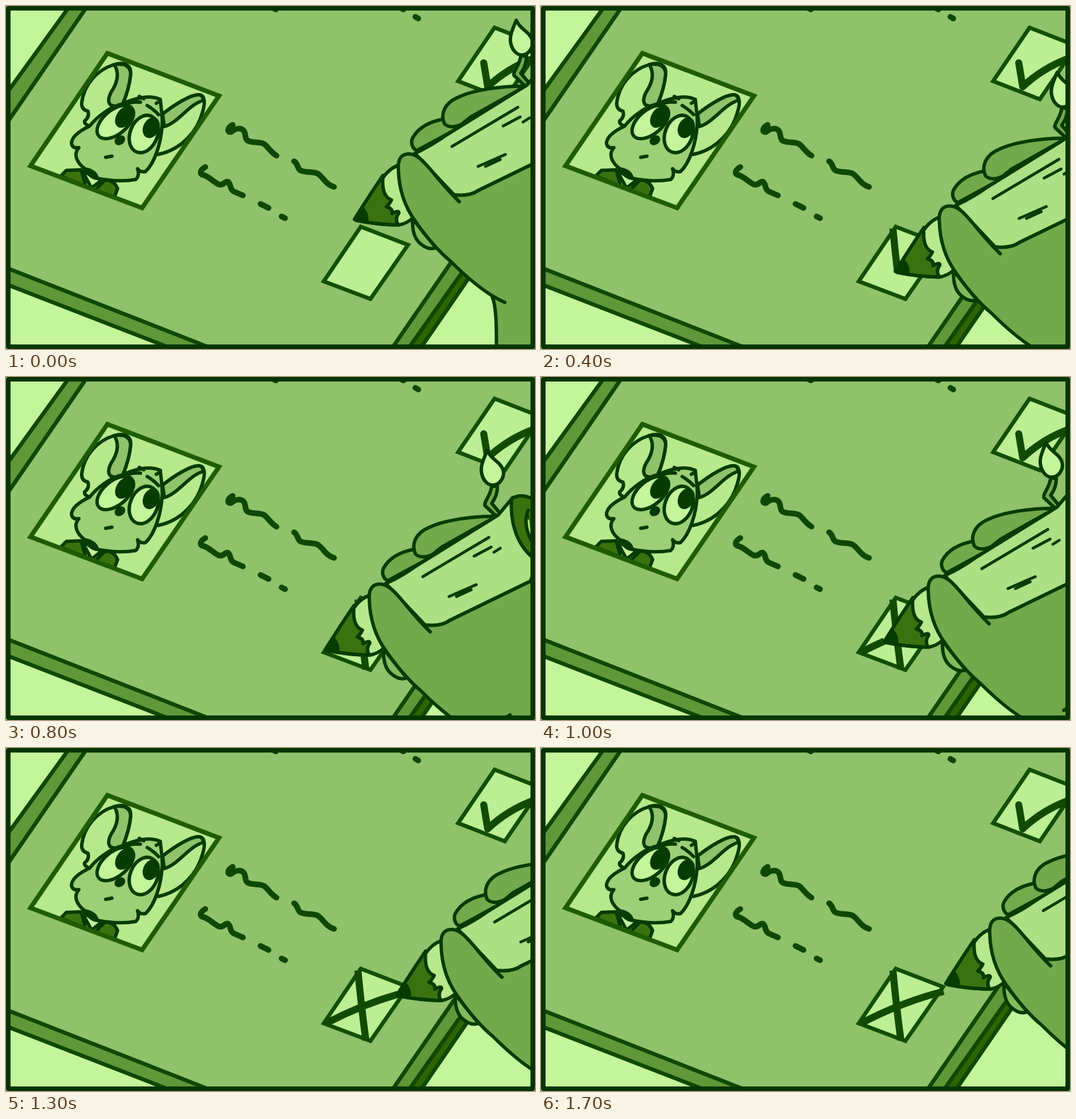
An HTML page for the animation above (1800 ms loop, 929 by 603 pixels).

```html
<!DOCTYPE html>
<html lang="en">
<head>
<meta charset="utf-8">
<title>Checklist</title>
<style>
  html, body { margin: 0; width: 100%; height: 100%; overflow: hidden; background: #063600; }
  svg { display: block; width: 929px; height: 603px; fill: none; stroke-linejoin: round; }
  .page { stroke: #0f4800; stroke-width: 7; }
  .mark { stroke: #124b00; stroke-width: 12.5; }
  .round { stroke-linecap: round; }
  .card { fill: #bcee94; stroke: #124f00; stroke-width: 7; stroke-linejoin: miter; }
  .ink { stroke: #063c00; stroke-width: 6; stroke-linecap: round; }
  .pale { fill: #b7e88c; }
  .light { fill: #c4f59b; }
  .paper { fill: #8fc26a; }
  .skin { fill: #73a84c; }
  .wood { fill: #addf84; }
  .deep { fill: #3b720f; }
  .dark { fill: #063c00; }
  .fur { fill: #9dcf76; }
  .band { fill: #5f9739; }
</style>
</head>
<body>
<svg viewBox="0 0 929 603">
  <rect class="paper" width="929" height="603"/>

  <!-- clipboard edges -->
  <path class="light" d="M0 0H112L0 155ZM0 489L293 603H0ZM727 603L908 340H929V603Z"/>
  <path class="band" d="M112 0H143L0 208V155ZM0 460L364 603H293L0 489ZM677 603L861 335H895L706 603Z"/>
  <path fill="#2d6400" d="M706 603L895 335H911L727 603Z"/>
  <path class="page" d="M112 0L0 155M143 0L0 208M0 460L364 603M0 489L293 603M677 603L861 335M706 603L895 335M727 603L911 335"/>

  <!-- scribbled text -->
  <path class="page round" style="stroke-width:10" d="M398 209C388 214 388 224 396 221C404 214 414 214 418 220C422 226 418 236 428 238C438 241 446 238 454 243C462 250 466 258 475 263
    M506 273C512 276 512 286 517 289C528 294 540 290 548 295C558 302 562 314 576 318M350 283C340 289 340 296 346 297C356 299 366 311 375 314C384 315 384 307 390 309C396 314 392 322 400 326L416 333
    M447 348L461 355M484 370L490 373M719 19L724 22M694 4L698 6M470 4L474 6"/>

  <!-- portrait -->
  <path class="pale" d="M178 83L374 158L239 355L43 281Z"/>
  <g class="ink">
    <path class="deep" d="M96 299L106 289L132 288L140 317ZM156 324L174 306Q190 306 196 321L190 337"/>
    <path class="light" d="M134 290L150 320L168 306Z"/>
    <path class="pale" d="M147 211Q137 208 138 202Q147 195 144 185Q132 182 133 170C137 138 160 112 190 103C210 97 220 106 219 119C217 140 211 158 205 172Z"/>
    <path class="paper" d="M190 103C199 117 196 132 188 146C181 156 177 169 184 174Q194 179 205 172C211 158 217 140 219 119Q218 99 190 103Z"/>
    <path class="pale" d="M275 190C295 174 325 155 339 156C350 157 350 171 345 187C337 217 311 252 267 261"/>
    <path class="paper" d="M275 190C295 174 325 155 339 156Q347 157 346 166C320 174 304 204 278 212Z"/>
    <path class="fur" d="M147 211C128 220 115 231 115 242Q117 251 128 249C117 261 125 277 140 287Q148 302 160 303C185 308 210 308 228 305Q235 298 231 286Q236 293 245 291C262 275 272 240 274 212C276 195 272 180 271 164Q256 158 240 161Q220 164 205 172C185 176 160 194 147 211Z"/>
    <path class="dark" d="M142 287Q157 291 160 302Q147 300 142 287Z"/>
    <path d="M205 174Q220 168 236 169M248 175Q260 182 268 191M234 159L242 163M264 171L271 167"/>
    <ellipse class="light" rx="38" ry="21" transform="translate(192 204) rotate(-40)"/>
    <ellipse class="light" rx="24" ry="34" transform="translate(242 225) rotate(22)"/>
    <path d="M175 266L186 264"/>
  </g>
  <g class="dark">
    <ellipse rx="14" ry="21" transform="translate(208 195) rotate(34)"/>
    <ellipse rx="14" ry="19" transform="translate(255 214) rotate(25)"/>
    <ellipse rx="10" ry="8" transform="translate(200 236) rotate(-35)"/>
  </g>
  <path stroke="#1f5c00" stroke-width="8" stroke-linejoin="miter" d="M178 83L374 158L239 355L43 281Z"/>

  <!-- answer boxes -->
  <path class="card" d="M858 38L794 132L876 164L940 70Z"/>
  <path class="mark round" d="M839 100L846 142Q882 108 930 91"/>
  <path class="card" d="M623 388L706 420L640 515L558 484Z"/>
  <path id="down" class="mark" pathLength="1" d="M618 391Q624 455 632 514"/>
  <path id="across" class="mark" pathLength="1" d="M562 484Q635 446 707 428"/>

  <g id="hand" class="ink">
    <path class="skin" d="M904 88C902 105 890 115 892 122L910 139Q918 142 918 135L904 118Q914 105 914 88Z"/>
    <path class="light" d="M896 25C891 38 884 52 886 63C888 78 898 87 907 86C920 85 927 70 924 60C920 45 903 42 896 25Z"/>
    <path class="skin" d="M722 254C714 252 710 240 714 232C725 212 748 202 772 198L830 195Z"/>
    <path class="skin" d="M912 141C870 140 820 148 795 160C768 171 763 192 770 207Q780 217 800 208L816 195Z"/>
    <path class="wood" d="M718 259Q745 247 770 229L820 198L915 139L941 108L1000 180L972 255L830 324Q815 335 787 332Z"/>
    <path class="deep" d="M939 110Q955 100 975 110L1010 240L972 210C945 185 936 145 939 110ZM968 130Q958 155 974 184"/>
    <path stroke-width="5" d="M783 247L899 178M873 211L903 195M908 204L919 197M829 282L877 261M842 282L868 270"/>
    <path class="pale" d="M612 375Q640 330 662 302Q675 283 695 278L715 372Q705 382 690 385Q650 384 616 377Z"/>
    <path class="deep" d="M612 375Q640 330 662 298C660 322 664 336 677 341Q672 350 668 353Q680 356 678 365Q690 358 690 364Q682 374 689 385Q650 384 616 377Z"/>
    <path class="dark" stroke="none" d="M611 376L626 352Q639 364 636 381L615 379Z"/>
    <path fill="#84b95e" d="M714 374C713 395 718 410 728 418Q742 430 755 425Z"/>
    <path class="skin" stroke="none" d="M708 260C695 260 688 268 689 286C690 330 705 360 720 380C735 402 760 432 780 448L856 513C862 530 862 560 861 700H1080V202L972 255L830 324Q815 335 787 332C752 295 732 260 708 260Z"/>
    <path d="M796 344C752 302 732 260 708 260C695 260 688 268 689 286C690 330 705 360 720 380C735 402 760 432 780 448Q836 504 876 521M854 512C862 530 862 560 861 700M787 332Q815 335 830 324L972 255M927 496L936 490"/>
  </g>

  <rect x="4" y="4" width="921" height="595" stroke="#063600" stroke-width="8"/>
</svg>
<script>
  const $ = id => document.getElementById(id);
  const hand = $('hand'), down = $('down'), across = $('across');
  const STEP = 100, STEPS = 18;

  // step, hand offset x, hand offset y
  const poses = [
    [0, 0, 0], [2, 6, 48], [6, 15, 135],
    [8, -51, 104], [10, -9, 90], [11, 15, 80], [12, 39, 70],
    [13, 75, 59], [17, 99, 39]
  ];

  function handAt(step) {
    const i = Math.max(1, poses.findIndex(p => p[0] >= step));
    const [s0, x0, y0] = poses[i - 1], [s1, x1, y1] = poses[i];
    const k = (step - s0) / (s1 - s0);
    return [x0 + (x1 - x0) * k, y0 + (y1 - y0) * k];
  }

  function reveal(path, amount) {
    const shown = Math.min(1, Math.max(0, amount));
    path.setAttribute('stroke-dasharray', shown + ' 2');
    path.style.display = shown ? '' : 'none';
  }

  function draw(now) {
    const step = Math.floor(now / STEP) % STEPS;
    const [x, y] = handAt(step);
    hand.setAttribute('transform', `translate(${x} ${y})`);
    reveal(down, step < 6 ? (y - 16) / 122 : 1);
    reveal(across, step < 8 ? 0 : (x + 51) / 144);
    requestAnimationFrame(draw);
  }
  draw(0);
</script>
</body>
</html>
```
